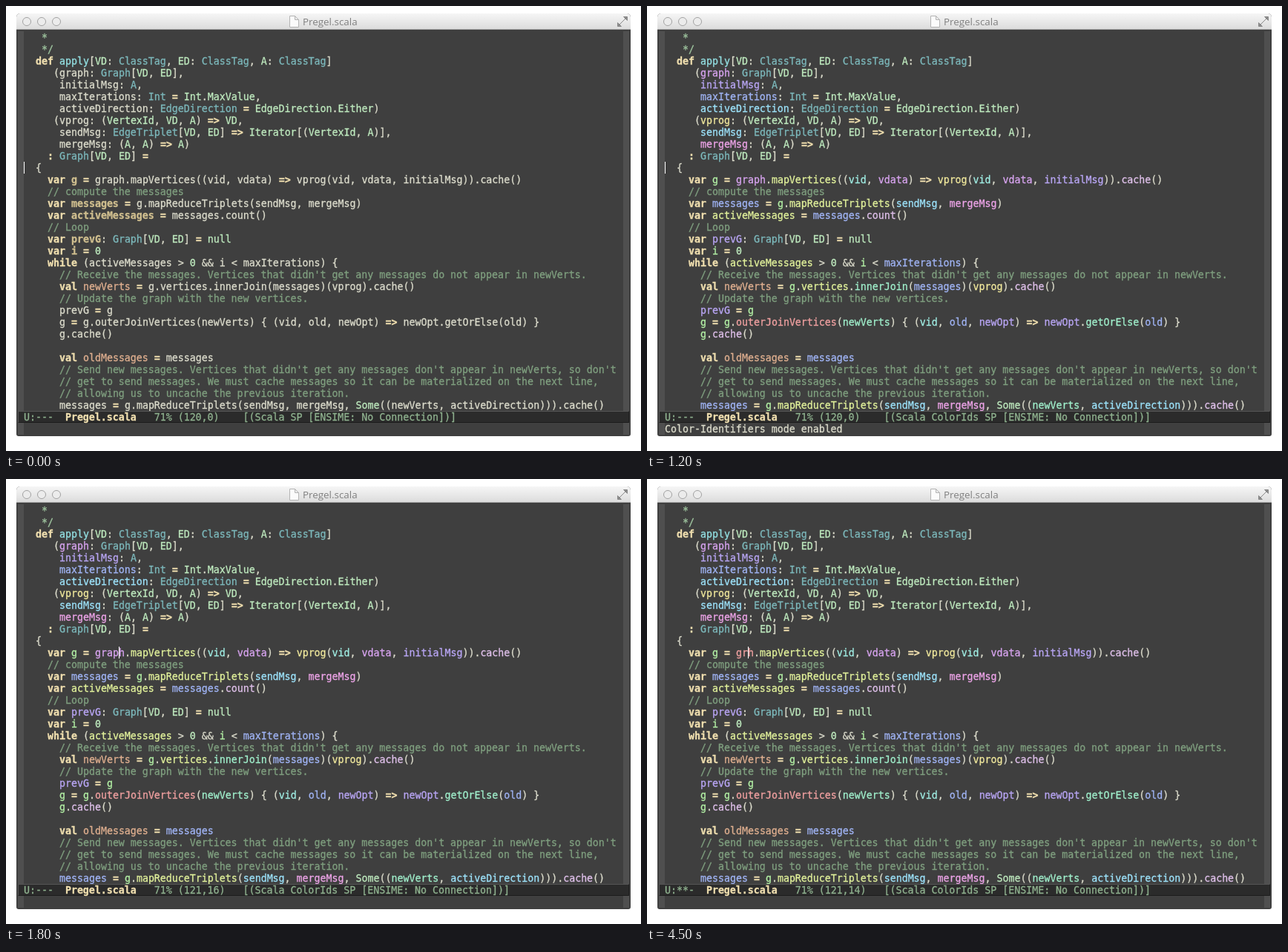
Write an HTML page that moves like this. It is 856 by 600 pixels and loops after 5.5 s.

```html
<!DOCTYPE html>
<html lang="en">
<head>
<meta charset="utf-8">
<style>
html, body { margin: 0; width: 100%; height: 100%; overflow: hidden; background: #fff; }
div, pre, svg { position: absolute; margin: 0; }
pre { font: 13.288px/16px "DejaVu Sans Mono", monospace; color: #dcdccc; font-variant-ligatures: none; -webkit-text-stroke: 0.3px; }
#win { left: 14px; top: 10px; width: 828px; height: 570px; border-radius: 5px 5px 3px 3px; background: #3f3f3f; overflow: hidden; }
#bar { width: 828px; height: 21px; background: linear-gradient(#f6f6f6, #dcdcdc); border-bottom: 1px solid #a5a5a5; }
#title { top: 0; height: 21px; font: 13.4px/22px "Open Sans", "Noto Sans", sans-serif; color: #808080; white-space: pre; }
#bar svg { left: 0; top: 0; }
.fringe { top: 24px; width: 8px; height: 544px; background: #4f4f4f; }
#code { left: 10px; top: 25px; overflow: hidden; }
#mode { left: 2px; width: 815px; height: 13px; line-height: 14px; padding: 1px 0 0 7px; background: #2b2b2b; color: #8fb28f;
  border: 1px solid; border-color: #555 #1c1c1c #1c1c1c #555; }
#mini { left: 10px; }
.cursor { width: 1px; height: 16px; background: #fff; }
.key { color: #f0dfaf; font-weight: bold; }
.type { color: #7cb8bb; }
.const { color: #bfebbf; }
.func { color: #93e0e3; }
.var { color: #d0bf8f; font-weight: bold; }
.val { color: #dfaf8f; }
.note { color: #7f9f7f; }
.doc { color: #9fc59f; }
.hit { color: #afd8af; font-weight: bold; }
</style>
</head>
<body>
<div id="win">
  <div id="bar">
    <svg width="828" height="21" fill="none" stroke="#a2a2a2">
      <g fill="#ececec"><circle cx="14" cy="11" r="5.5"/><circle cx="34" cy="11" r="5.5"/><circle cx="54" cy="11" r="5.5"/></g>
      <path id="page" fill="#fbfbfb" stroke="#b4b4b4" d="M368.5 3.5h7l5 5v10h-12zM375.5 3.5v5h5"/>
      <path fill="#8a8a8a" stroke="#8a8a8a" d="M818.5 4.500h5v5zM821 7l-4 4M810.500 12.500v5h5zM813 15l4-4"/>
    </svg>
    <div id="title"></div>
  </div>
  <div class="fringe" style="left:2px"></div>
  <div class="fringe" style="left:818px"></div>
  <pre id="code"></pre>
  <pre id="mode"></pre>
  <pre id="mini"></pre>
  <div class="cursor" id="point"></div>
  <div class="cursor" id="prompt"></div>
</div>
<script>
const source = `   *
   */
  def apply[VD: ClassTag, ED: ClassTag, A: ClassTag]
     (graph: Graph[VD, ED],
      initialMsg: A,
      maxIterations: Int = Int.MaxValue,
      activeDirection: EdgeDirection = EdgeDirection.Either)
     (vprog: (VertexId, VD, A) => VD,
      sendMsg: EdgeTriplet[VD, ED] => Iterator[(VertexId, A)],
      mergeMsg: (A, A) => A)
    : Graph[VD, ED] =
  {
    var g = @.mapVertices((vid, vdata) => vprog(vid, vdata, initialMsg)).cache()
    // compute the messages
    var messages = g.mapReduceTriplets(sendMsg, mergeMsg)
    var activeMessages = messages.count()
    // Loop
    var prevG: Graph[VD, ED] = null
    var i = 0
    while (activeMessages > 0 && i < maxIterations) {
      // Receive the messages. Vertices that didn't get any messages do not appear in newVerts.
      val newVerts = g.vertices.innerJoin(messages)(vprog).cache()
      // Update the graph with the new vertices.
      prevG = g
      g = g.outerJoinVertices(newVerts) { (vid, old, newOpt) => newOpt.getOrElse(old) }
      g.cache()

      val oldMessages = messages
      // Send new messages. Vertices that didn't get any messages don't appear in newVerts, so don't
      // get to send messages. We must cache messages so it can be materialized on the next line,
      // allowing us to uncache the previous iteration.
      messages = g.mapReduceTriplets(sendMsg, mergeMsg, Some((newVerts, activeDirection))).cache()`;

// Identifiers grouped by the colour they share
const palette = {
  "#f0a0a0": "outerJoinVertices grh",
  "#f0e89c": "vprog",
  "#e2f29b": "mapVertices mapReduceTriplets activeMessages vertices",
  "#b4f2a6": "g i",
  "#a0f0cc": "newVerts innerJoin getOrElse grah",
  "#a0eee4": "vid",
  "#9ce2fa": "activeDirection sendMsg",
  "#a0b4f5": "messages maxIterations old",
  "#b9a6f5": "initialMsg prevG newOpt",
  "#d8a4f0": "graph vdata",
  "#eda4e8": "mergeMsg",
  "#dfc0ea": "cache count"
};
const tint = {};
for (const [color, names] of Object.entries(palette))
  for (const name of names.split(" ")) tint[name] = color;

const scenes = [
  { at: 0 },
  { at: 600, menu: true },
  { at: 1200, ids: true, echo: "Color-Identifiers mode enabled" },
  { at: 1800, ids: true, col: 16 },
  { at: 2400, ids: true, col: 15, word: "grah" },
  { at: 3000, ids: true, col: 14, word: "grh" }
];
const commands = ["identifiers-mode", ..."print select submit compare describe solarized".split(" ").map(s => "theme-" + s)];

const $ = id => document.getElementById(id);

function span(text, cls, color) {
  const el = document.createElement("span");
  el.textContent = text;
  if (cls) el.className = cls;
  if (color) el.style.color = color;
  return el;
}

function token(text, before, ids) {
  if (/^\s+\*/.test(text)) return span(text, "doc");
  if (text.startsWith("//")) return span(text, "note");
  if (/^(def|var|val|while|=>?)$/.test(text)) return span(text, "key");
  if (text === ":" && before.endsWith(" ")) return span(text, "key");
  if (/^(null|\d+)$/.test(text)) return span(text, "const");
  if (/^[A-Z]/.test(text)) return span(text, before.endsWith(": ") ? "type" : "const");
  if (text === "apply") return span(text, "func");
  if (before.endsWith("val ")) return span(text, "val");
  if (ids && tint[text]) return span(text, "", tint[text]);
  return span(text, before.endsWith("var ") ? "var" : "");
}

function highlight(text, ids) {
  const parts = text.matchAll(/^ +\*\/?$|\/\/.*|\w+|=>|[^\w]/gm);
  return Array.from(parts, m => token(m[0], text.slice(Math.max(0, m.index - 4), m.index), ids));
}

function place(el, col, row) {
  el.style.left = 10 + col * 8 + "px";
  el.style.top = 24 + row * 16 + "px";
}

function show({ menu, ids, echo = "", col = 0, word = "graph" }) {
  const rows = menu ? 25 : 32;
  $("title").textContent = menu ? "*Minibuf-1*" : "Pregel.scala";
  $("title").style.left = menu ? "378px" : "386px";
  $("page").style.display = menu ? "none" : "";

  $("code").replaceChildren(...highlight(source.replace("@", word), ids));
  $("code").style.height = rows * 16 + "px";

  const pos = `(${col ? 121 : 120},${col})`;
  $("mode").style.top = 24 + rows * 16 + "px";
  $("mode").replaceChildren(
    `U:${word === "graph" ? "---" : "**-"}  `, span("Pregel.scala", "key"),
    `   71% ${pos.padEnd(11)}[(Scala ${ids ? "ColorIds " : ""}SP [ENSIME: No Connection])]`);

  $("mini").style.top = 25 + (rows + 1) * 16 + "px";
  $("mini").replaceChildren(echo);
  if (menu) {
    $("mini").append(span("M-x ", "", "#f0dfaf"), "colo\n-> ");
    commands.forEach((name, i) => i
      ? $("mini").append("\n   ", span("colo", "hit"), "r-" + name)
      : $("mini").append(span("color-" + name, "key")));
  }

  place($("point"), col, col ? 12 : 11);
  place($("prompt"), 8, 26);
  $("prompt").style.display = menu ? "" : "none";
}

let current;
function tick() {
  const t = performance.now() % 5500;
  const scene = scenes.findLast(s => s.at <= t);
  if (scene !== current) show(current = scene);
  requestAnimationFrame(tick);
}
tick();
</script>
</body>
</html>
```
